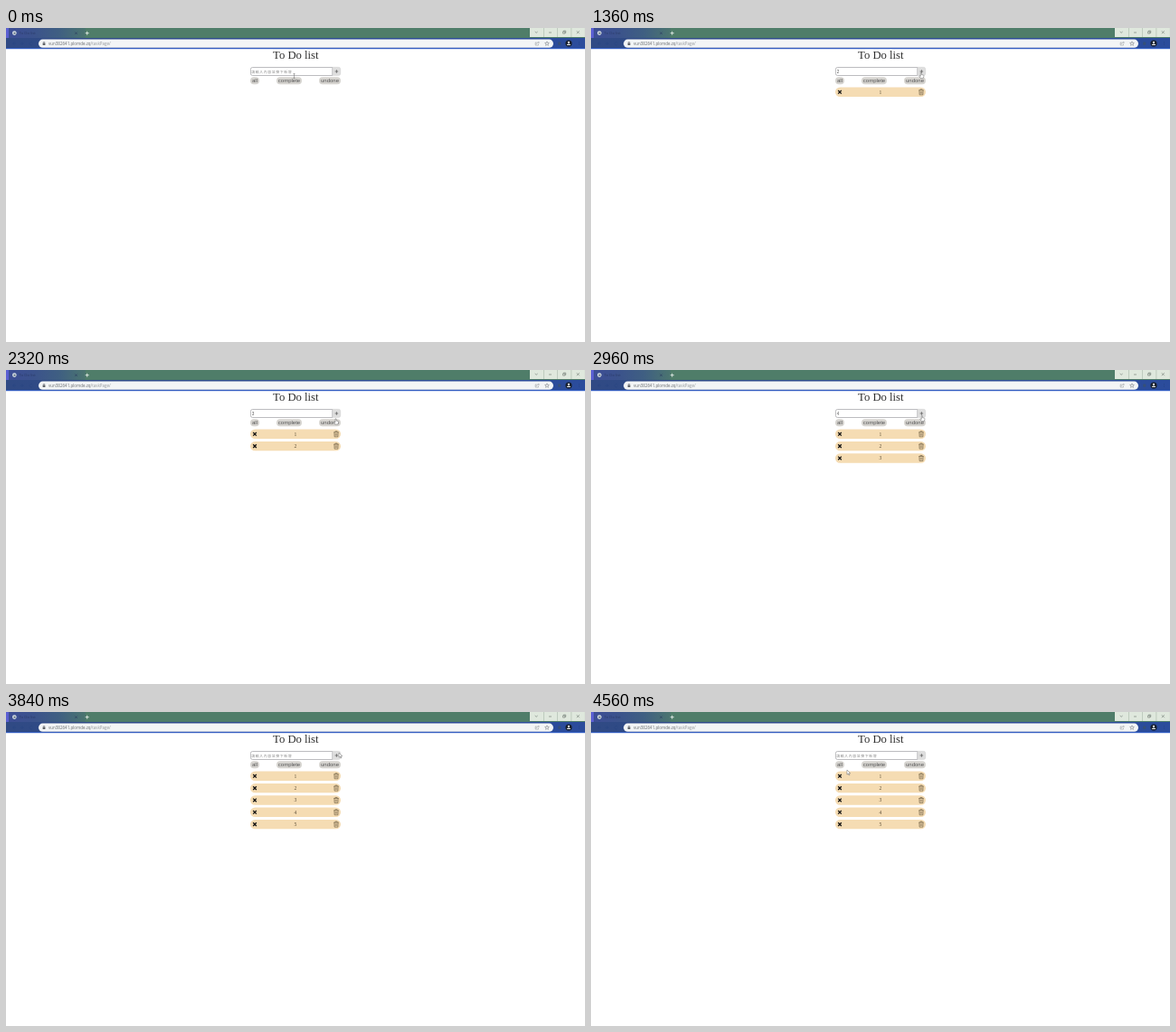
Recreate the animation shown at these times as an HTML page with a canvas. Size 640 px wide and 347 px high, loop 4640 ms.

```html
<!DOCTYPE html>
<html lang="en">
<head>
<meta charset="utf-8">
<title>To Do list</title>
<style>
html, body { margin: 0; width: 100%; height: 100%; overflow: hidden; background: #fff; }
canvas { display: block; width: 640px; height: 347px; }
</style>
</head>
<body>
<canvas id="stage"></canvas>
<script>
const W = 640, H = 347, LOOP = 4640, STEP = 80;
const ITEMS = 5, TYPE_LEAD = 300;
const SANS = '"Liberation Sans", Arial, sans-serif';
const SERIF = '"Liberation Serif", "Times New Roman", serif';
const UI = '"Open Sans", "Noto Sans", sans-serif';
const CJK = '"Noto Sans CJK TC", "Noto Sans CJK", "Noto Sans CJK JP", sans-serif';

const canvas = document.getElementById('stage');
const ctx = canvas.getContext('2d');
const dpr = window.devicePixelRatio || 1;
canvas.width = W * dpr;
canvas.height = H * dpr;

// Items arrive a little faster each time
const addedAt = i => 700 + 880 * i - 30 * i * i;

// Pointer stops: enter from the input, hover over the button, leave to the list
const stops = [
  { t: 0, x: 318.5, y: 53 },
  { t: 640, x: 365, y: 46.5 },
  { t: 2320, x: 364.5, y: 54 },
  { t: 3840, x: 368, y: 45 },
  { t: LOOP, x: 280.5, y: 64.5 }
];

function rect(x, y, w, h, fill) {
  ctx.fillStyle = fill;
  ctx.fillRect(x, y, w, h);
}

function gradient(x, w, ...colors) {
  const g = ctx.createLinearGradient(x, 0, x + w, 0);
  colors.forEach((c, i) => g.addColorStop(i / (colors.length - 1), c));
  return g;
}

function round(x, y, w, h, r, fill, stroke, lw = 0.7) {
  ctx.beginPath();
  ctx.roundRect(x, y, w, h, r);
  if (fill) { ctx.fillStyle = fill; ctx.fill(); }
  if (stroke) { ctx.strokeStyle = stroke; ctx.lineWidth = lw; ctx.stroke(); }
}

function disc(x, y, r, fill) {
  ctx.beginPath();
  ctx.arc(x, y, r, 0, Math.PI * 2);
  ctx.fillStyle = fill;
  ctx.fill();
}

// Draws an SVG path with its origin at x, y
function icon(x, y, d, stroke, lw, fill) {
  const p = new Path2D(d);
  ctx.save();
  ctx.translate(x, y);
  if (fill) { ctx.fillStyle = fill; ctx.fill(p); }
  ctx.strokeStyle = stroke;
  ctx.lineWidth = lw;
  ctx.stroke(p);
  ctx.restore();
}

function text(s, x, y, font, fill, align = 'left', spacing = 0) {
  ctx.font = font;
  ctx.fillStyle = fill;
  ctx.textAlign = align;
  ctx.letterSpacing = spacing + 'px';
  ctx.fillText(s, x, y);
  return ctx.measureText(s).width;
}

function cross(x, y, r, color, lw) {
  icon(x, y, `M${-r} ${-r}L${r} ${r}M${r} ${-r}L${-r} ${r}`, color, lw);
}

function plus(x, y, r, color, lw) {
  icon(x, y, `M${-r} 0H${r}M0 ${-r}V${r}`, color, lw);
}

function drawTabs() {
  rect(0, 0, W, 12, '#4f7d69');
  rect(0, 0, 88, 11, gradient(0, 88, '#3d4d96', '#3b528c', '#3f5f82', '#4b756f'));
  rect(0, 0, 3, 11, '#5a5fd2');
  disc(9.3, 5.6, 2.3, '#dfe6ea');
  disc(9.5, 5.8, 1.2, '#71808f');
  text('To Do list', 14.5, 7.4, '4.3px ' + UI, '#2c3d6a');
  cross(77.5, 5.7, 1.2, '#25345c', 0.6);
  plus(89.7, 5.7, 2, '#f4f8f5', 0.8);

  rect(579, 0, 61, 10, '#dfe8dd');
  for (let x = 594; x < W; x += 15.3) rect(x, 0, 0.6, 10, '#a9b8ab');
  const ink = '#6b756d';
  icon(586.2, 5.3, 'M-1.5-1.3L0 0L1.5-1.3', ink, 0.6);
  icon(601.5, 5, 'M-1.5 0H1.5', ink, 0.6);
  icon(616.7, 5, 'M-1.1-1.1H1.1V1.1H-1.1ZM-.3-1.1V-1.9H2V.4H1.1', ink, 0.6);
  cross(632.3, 4.7, 1.5, ink, 0.6);
}

function drawToolbar() {
  rect(0, 11, W, 12, gradient(0, W, '#304a84', '#2c4b90', '#2b4c9c'));
  rect(0, 22.2, W, 1, '#3562cc');

  const dark = '#294681';
  icon(9.3, 17.2, 'M.2-1.7L-1.8 0L.2 1.7M-1.8 0H1.7', dark, 0.6);
  icon(17.3, 17.2, 'M-.2-1.7L1.8 0L-.2 1.7M1.8 0H-1.7', dark, 0.6);
  icon(28, 17.2, 'M1.6.9A1.8 1.8 0 1 1 1.4-1.1', dark, 0.6);

  round(36, 12.6, 569, 9.2, 4.6, '#f3f5f6');
  round(40.6, 16.6, 2.8, 2.4, 0.3, '#5f6368');
  icon(42, 16.7, 'M-.8 0V-1.2H.8V0', '#5f6368', 0.5);
  const font = '4.5px ' + UI;
  const w = text('vun382641.plomde.zq', 47, 18.8, font, '#666a6e');
  text('/taskPage/', 47 + w, 18.8, font, '#93979a');

  icon(587, 17, 'M-.5-1H-1.8V2H1.5V1M-.6.7L.2-.9H2.3M1.3-1.9L2.4-.9L1.3.1', '#85898d', 0.5);
  ctx.beginPath();
  for (let i = 0; i < 10; i++) {
    const a = i * Math.PI / 5 - Math.PI / 2, r = i % 2 ? 1.1 : 2.5;
    ctx.lineTo(598 + Math.cos(a) * r, 17.3 + Math.sin(a) * r);
  }
  ctx.closePath();
  ctx.strokeStyle = '#6b7076';
  ctx.lineWidth = 0.5;
  ctx.stroke();

  round(610.3, 15.6, 3, 3.2, 0.6, '#365078');
  disc(622, 17, 3.6, '#18202e');
  disc(622, 15.9, 1.1, '#eef1f4');
  ctx.beginPath();
  ctx.ellipse(622, 19, 2.2, 1.5, 0, Math.PI, 0);
  ctx.fill();
  for (let i = -1; i <= 1; i++) disc(633.5, 17 + i * 1.6, 0.45, '#233f7b');
}

// The digit waiting in the input, or 0 when it is empty
function pendingDigit(t) {
  for (let i = 0; i < ITEMS; i++)
    if (t < addedAt(i)) return t >= addedAt(i) - TYPE_LEAD ? i + 1 : 0;
  return 0;
}

function drawForm(t) {
  text('To Do list', 320.3, 34.1, '12.7px ' + SERIF, '#2e2e2e', 'center');

  round(270.4, 43.5, 90.4, 9, [2.2, 0, 0, 2.2], '#fff', '#a0a0a4');
  const digit = pendingDigit(t);
  if (digit) text(digit, 271.8, 49.8, '4.6px ' + SANS, '#555');
  else text('請輸入內容並按下新增', 271.3, 49.5, '3.9px ' + CJK, '#8c8c8c', 'left', 0.6);

  round(361.1, 43.3, 8.7, 9.3, [0, 2.4, 2.4, 0], '#dedede', '#c9c9c9', 0.4);
  plus(365.4, 48, 1.8, '#555', 0.7);

  for (const [label, x, w] of [['all', 270, 10], ['complete', 299, 28], ['undone', 346, 24]]) {
    round(x, 54.3, w, 8, 4, '#d6d4d0');
    text(label, x + w / 2, 60.2, '6px ' + SANS, '#555', 'center');
  }
}

function drawItem(i) {
  const y = 70.8 + i * 13.33;
  round(270, y - 5.2, 100, 10.4, 5.2, '#f5dcb3');
  cross(275, y, 1.8, '#111', 1.3);
  text(i + 1, 320, y + 2, '5.6px ' + SERIF, '#5a4e38', 'center');
  icon(365, y, 'M-2.8-2H2.8M-1.1-2V-3H1.1V-2M-2.1-2L-1.9 3H1.9L2.1-2M-.8-.9V2M.8-.9V2', '#57482f', 0.55);
}

function pointerAt(t) {
  const k = stops.findIndex(s => s.t > t);
  const a = stops[k - 1], b = stops[k];
  const u = (t - a.t) / (b.t - a.t), e = u * u * (3 - 2 * u);
  return [a.x + (b.x - a.x) * e, a.y + (b.y - a.y) * e];
}

function drawPointer(t) {
  const [x, y] = pointerAt(t);
  const beam = 'M0-2.5V2.5M-1-2.5H1M-1 2.5H1';
  const hand = 'M-.5 0Q0-.5.5 0V2L2.8 2.7Q3.3 3 3.1 4L2.5 6H-.7L-2.2 3.6Q-2 2.8-1.2 3.4L-.5 4Z';
  const arrow = 'M0 0V5.2L1.3 4.1L2.1 6L3 5.6L2.2 3.8H3.8Z';
  if (x < 361 && y < 54) icon(x, y, beam, '#666', 0.5);
  else icon(x, y, x > 361 && x < 368 ? hand : arrow, '#666', 0.5, '#fff');
}

function frame(now) {
  const t = Math.floor((now % LOOP) / STEP) * STEP;
  ctx.setTransform(dpr, 0, 0, dpr, 0, 0);
  rect(0, 0, W, H, '#fff');
  drawTabs();
  drawToolbar();
  drawForm(t);
  for (let i = 0; i < ITEMS && t >= addedAt(i); i++) drawItem(i);
  drawPointer(t);
  requestAnimationFrame(frame);
}
requestAnimationFrame(frame);
</script>
</body>
</html>
```
